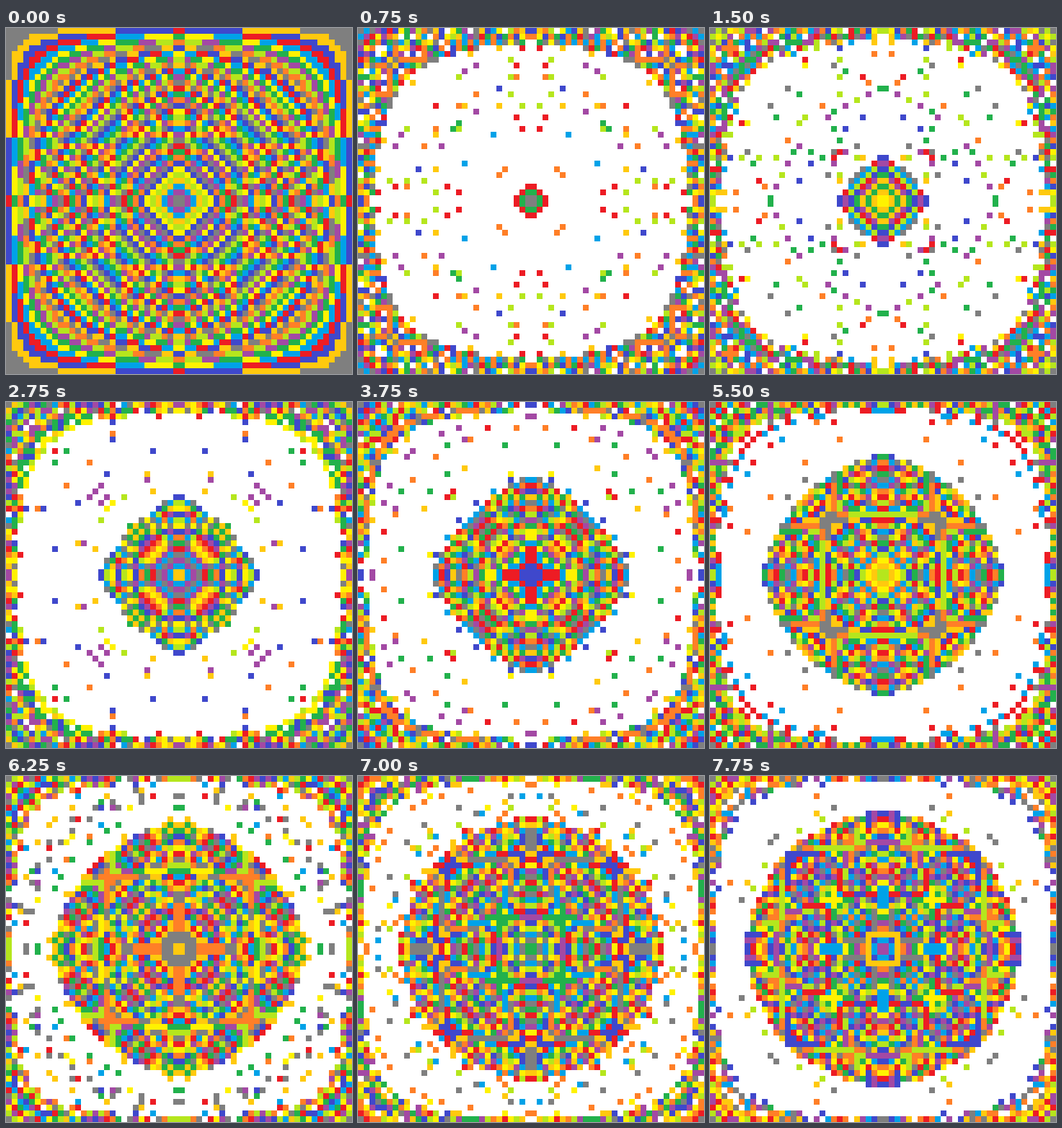
An HTML page with a canvas that plays this animation: 480x480 px, repeating every 8 s.

```html
<!DOCTYPE html>
<html>
<head>
<meta charset="utf-8">
<style>
  html, body { margin: 0; width: 100%; height: 100%; overflow: hidden; background: #fff; }
  canvas { display: block; width: 480px; height: 480px; }
</style>
</head>
<body>
<canvas id="stage" width="480" height="480"></canvas>
<script>
  // Mirrored multiplication table, raised to a slowly growing power.
  // Each cell is coloured by the next-to-last character of its value
  // written with four significant digits; a decimal point stays white.
  const DIGIT_COLORS = ['#7f7f7f', '#ffc90e', '#3f48cc', '#ed1c24', '#00a2e8',
                        '#fff200', '#22b14c', '#a349a4', '#b5e61d', '#ff7f27'];
  const HALF = 30, CELL = 8, STEP_MS = 250, STEPS = 32;
  const ctx = document.getElementById('stage').getContext('2d');

  function cellColor(n, power) {
    const text = String(Number(Math.pow(n, power).toPrecision(4))).padStart(2, '0');
    return DIGIT_COLORS[text[text.length - 2]] || '#fff';
  }

  function draw(step) {
    const power = 1 + step / 99;
    for (let row = 0; row < HALF; row++) {
      for (let col = 0; col < HALF; col++) {
        ctx.fillStyle = cellColor((row + 1) * (col + 1), power);
        for (const x of [col, 2 * HALF - 1 - col]) {
          for (const y of [row, 2 * HALF - 1 - row]) {
            ctx.fillRect(x * CELL, y * CELL, CELL, CELL);
          }
        }
      }
    }
  }

  const start = performance.now();
  let shown = -1;
  function tick() {
    const step = Math.floor((performance.now() - start) / STEP_MS) % STEPS;
    if (step !== shown) draw(shown = step);
    requestAnimationFrame(tick);
  }
  tick();
</script>
</body>
</html>
```
